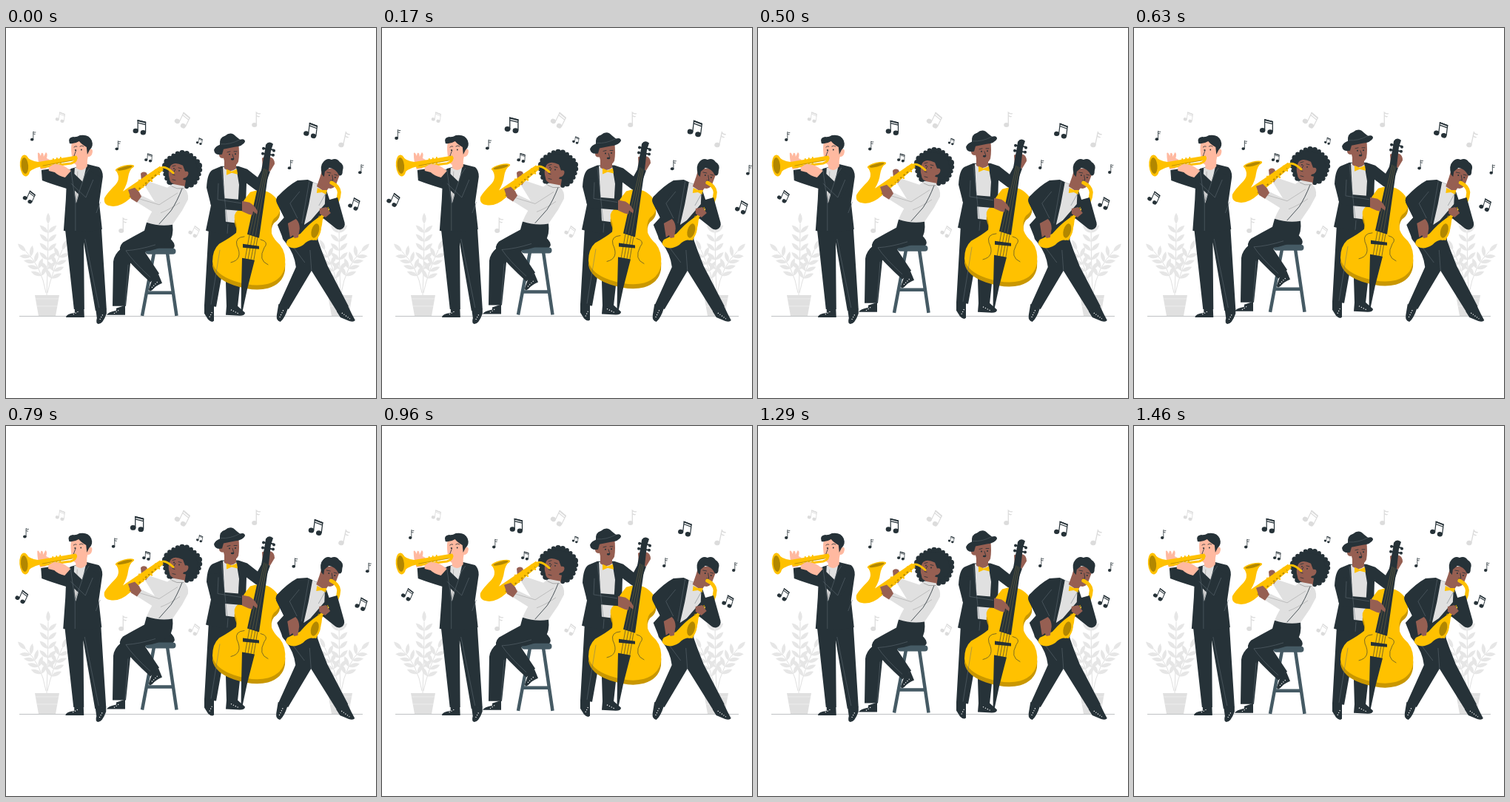
An HTML page for the animation above (1.5 s loop, 500 by 500 pixels).

```html
<!DOCTYPE html>
<html lang="en">
<head>
<meta charset="utf-8">
<title>Jazz band</title>
<style>
html, body { margin: 0; width: 100%; height: 100%; overflow: hidden; background: #fff; }
svg { display: block; width: 100%; height: 100%; }
.dark { fill: #263238; }
.gold { fill: #ffc100; }
.deep { fill: #b28700; }
.pale { fill: #ffb9a0; }
.brown { fill: #965f52; }
.shirt { fill: #e0e0e0; }
.limb { fill: none; stroke: #263238; stroke-linejoin: round; }
.tube { fill: none; stroke: #ffc100; stroke-linecap: round; stroke-linejoin: round; }
.seam { fill: none; stroke: #67737a; stroke-width: .5; }
.ink { fill: none; stroke: #263238; stroke-width: .8; stroke-linecap: round; }
.lace { fill: none; stroke: #fff; stroke-width: 1.2; stroke-dasharray: 1.2 2; }
</style>
</head>
<body>
<svg viewBox="0 0 500 500">
  <defs>
    <g id="pair">
      <ellipse cx="-4.7" cy="5.5" rx="3.6" ry="3.2"/>
      <ellipse cx="5.3" cy="7.7" rx="3.6" ry="3.2"/>
      <path d="M-1.8 5.5V-8.500L8.500 -6V7.500M-1.800 -5.300L8.500 -2.800" fill="none" stroke="currentColor" stroke-width="1.2"/>
      <path d="M-2.4 -9.300L9 -6.500V-4.600L-2.400 -7.400Z"/>
    </g>
    <g id="single">
      <ellipse cx="-.8" cy="5" rx="2.2" ry="1.900"/>
      <path d="M.8 5V-5.500Q2 -4 4.300 -4.600M.8 -3Q2 -1.600 3.600 -2.200" fill="none" stroke="currentColor" stroke-width=".8"/>
    </g>
    <path id="leaf" d="M0 0Q-6 -8 0 -17Q6 -8 0 0Z"/>
    <path id="bassBody" d="M330 222Q346 216 358 224Q372 234 370 247Q369 253 362 258Q357 264 359 278Q362 286 370 293Q379 304 377 322Q374 340 354 346Q335 351 308 342Q282 333 279 316Q279 300 288 292Q304 283 311 277Q313 268 310 262Q306 252 314 246Q320 234 330 222Z"/>
    <g id="plant">
      <g id="leaves" fill="#e6e6e6"></g>
      <path d="M39 361H72L67 389H44Z" fill="#e0e0e0"/>
      <path d="M40 366H71M42 376H69" stroke="#ececec"/>
    </g>
  </defs>

  <use href="#plant"/>
  <use href="#plant" transform="matrix(-1 0 0 1 507 0)"/>
  <g id="paleNotes" fill="#dcdcdc" color="#dcdcdc"></g>
  <path d="M18 389.500H482" stroke="#b8bcbe" stroke-width=".9"/>

  <g class="shake">
    <path class="dark" d="M80 271H105L106 380L92 380ZM102 271L129 269L136 380L121 382Z"/>
    <path class="dark" d="M93 379L105.500 379L106 391H81Q82 386 93 385ZM121.500 381L136 379.500L136 386Q131 400 125 400Q121 399 123 392Z"/>
    <path class="lace" d="M91 387L98 383M127 394L131 387"/>
    <path class="dark" d="M48 192L62 190L86 191L92 214L82 217Q62 211 49 206Z"/>
    <path class="dark" d="M88 190L110 184L126 188Q131 192 131 201L126 236L130 272Q103 278 78 274L81 232L82 208Q82 195 88 190Z"/>
    <path class="shirt" d="M93 189L109 186L106 199L95 237Q91 210 93 189Z"/>
    <path class="ink" d="M97 194L95 234" style="stroke:#aaa"/>
    <path class="pale" d="M95 178H110V187Q102 196 95 189Z"/>
    <path class="pale" d="M89 155Q98 148 110 154L112 164Q118 162 117 168Q116 174 111 174Q110 184 102 185Q92 187 90 178Q87 164 89 155Z"/>
    <path class="dark" d="M86 156Q83 148 91 147Q95 148 100 145Q112 143 116 152Q119 160 113 165L110 171L109 161Q102 157 99 153Q93 157 86 156Z"/>
    <path class="ink" d="M92 161Q94 159 96 160M100 160Q103 158 105 160M95 165L92 173L95 174"/>
    <circle class="dark" cx="94" cy="165" r=".9"/><circle class="dark" cx="102" cy="164.500" r=".9"/>
    <path class="pale" d="M43 169Q45 167 47 173L48 169Q51 168 51 174L54 168Q57 169 55 176L59 178Q57 187 54 190L47 191Q43 182 43 169Z"/>
    <path class="gold" d="M27 172Q32 180 44 181L95 172.500Q98 175 96 178L48 187Q33 190 27 200Z"/>
    <path class="tube" d="M48 188L88 183Q95 181 95 176" stroke-width="3"/>
    <path class="tube" d="M64 177V190M69 176V189M74 175V188" stroke-width="2"/>
    <ellipse class="gold" cx="26" cy="186" rx="7" ry="14.500" transform="rotate(-5 26 186)"/>
    <ellipse class="deep" cx="25.500" cy="186" rx="4.700" ry="11" transform="rotate(-5 25.500 186)"/>
    <path class="ink" d="M50 186L90 179" style="stroke:#b28700"/>
    <path class="limb" d="M122 198L108 223L84 200" stroke-width="16"/>
    <path class="pale" d="M58 188L65 184Q75 184 81 188L88 193L80 202Q71 200 66 195L58 193Z"/>
    <path class="seam" d="M88 192L94 236L107 198L113 189M94 236V274M118 205L108 229L88 210M107 285L126 378M128 235L122 250"/>
  </g>

  <g class="float">
    <path class="dark" d="M149 379L161 375V388H136Q138 384 149 382Z"/>
    <path class="lace" d="M146 386L153 381"/>
    <path class="dark" d="M192 274Q218 276 227 291Q230 298 222 300L186 304L168 318L162 376H144L145 316Q146 306 156 298Z"/>
    <path d="M200 304L184 389M218 304L230.500 389M191 358H224" stroke="#455a64" stroke-width="4.500" fill="none"/>
    <rect x="188.500" y="298" width="41" height="8" rx="4" fill="#455a64"/>
    <path class="dark" d="M190 263L225 265Q227 282 220 290Q205 301 187 302L207 332L195 344Q170 321 156 304Q151 297 158 290Q172 282 187 274Z"/>
    <path class="dark" d="M198 339L206 333L211 345Q203 348 198 354Q193 358 193 353Z"/>
    <path class="lace" d="M197 351L205 343"/>
    <path class="seam" d="M202 293Q180 300 162 301Q171 315 195 337M165 320L161 375"/>
    <ellipse class="dark" cx="238" cy="192" rx="25" ry="23.500"/>
    <g id="curls" class="dark"></g>
    <path class="brown" d="M229 203L243 206L241 218L225 215Z"/>
    <path class="shirt" d="M225 211L241 214L241 217Q247 222 246 232L238 247L225 266Q208 269 190 263Q196 248 204 240L188 214L194 208L218 216Z"/>
    <path class="brown" d="M222 187Q227 180 239 186L242 194Q248 193 246 199Q244 203 240 203Q237 213 229 211Q221 210 221 204Q218 195 222 187Z"/>
    <path class="ink" d="M225 187L229 186M233 189L237 190M229 191L225 198L228 199M225 205L229 206"/>
    <circle class="dark" cx="227" cy="190" r=".9"/><circle class="dark" cx="234" cy="193" r=".9"/>
    <path class="brown" d="M182 197Q185 193 190 196L194 207L189 214L183 207Z"/>
    <path class="gold" d="M208 187L213 192L167 231Q155 242 143 241Q131 240 133 230Q136 224 148 212Q156 203 148 192L173 186Q166 193 165 202Q164 211 158 221Z"/>
    <ellipse class="gold" cx="160.500" cy="189.500" rx="13" ry="3.600" transform="rotate(-14 160.500 189.500)"/>
    <ellipse class="deep" cx="160.500" cy="189.500" rx="10.500" ry="2.200" transform="rotate(-14 160.500 189.500)"/>
    <path class="tube" d="M209 190Q214 185 226 196" stroke-width="3"/>
    <path d="M207 195L166 229" fill="none" stroke="#b28700" stroke-width="2" stroke-dasharray="2.500 3"/>
    <path class="tube" d="M180 206L185 215M190 200L197 207M202 192L207 198" stroke-width="2.400"/>
    <path class="shirt" d="M241 219Q248 225 243 235L215 253Q209 256 203 252L176 235L182 226L207 238L228 222Z"/>
    <path class="seam" style="stroke:#999" d="M180 231L207 239L232 223M209 250Q220 246 235 236"/>
    <path class="brown" d="M165 219L174 216L180 222L183 228L177 236L169 231Z"/>
    <path class="ink" d="M238 217Q231 235 223 247L207 265" stroke-width="2"/>
    <path class="ink" d="M224 214L231 217L240 217" style="stroke:#999"/>
  </g>

  <g class="float">
    <path class="dark" d="M274 270L312 274L317 340L313 377H298L296 310L284 377L268 375Z"/>
    <path class="dark" d="M268 374L281 376V396Q278 399 273 394L268 386ZM298 376L313 376L323 385Q323 389 316 389L297 388Z"/>
    <path class="lace" d="M275 391L279 383M304 381L314 386"/>
    <path class="dark" d="M291 187L314 187L326 191L340 202L346 191L357 194L348 219Q344 224 337 219L325 210L323 270L309 279Q289 280 270 274L277 240L271 216Q272 196 279 192Z"/>
    <path class="shirt" d="M293 188L311 188L315 212L312 264L297 262Z"/>
    <path class="brown" d="M295 177H311V190Q303 197 295 190Z"/>
    <path class="brown" d="M292 160L314 155Q316 170 314 181Q310 189 302 187Q295 184 294 176Q288 177 288 171Q289 166 292 169Z"/>
    <path class="dark" d="M289 158Q288 148 296 146Q304 139 311 147L316 151Q323 149 323 154Q320 160 309 161L294 164L292 171Q282 173 281 165Q283 160 289 158Z"/>
    <path d="M290 157Q303 158 316 151" fill="none" stroke="#4a555b" stroke-width=".8"/>
    <path class="ink" d="M299 168L303 167M308 167L312 167M306 171L308 177L305 177"/>
    <circle class="dark" cx="302" cy="171" r="1"/><circle class="dark" cx="310" cy="170.500" r="1"/>
    <ellipse class="dark" cx="306" cy="177.500" rx="2.200" ry="1.300"/>
    <path class="gold" d="M298 191L305 194L312 191L313 198L305 196L298 199Z"/>
    <use href="#bassBody" y="6" fill="#c99700"/>
    <use href="#bassBody" class="gold"/>
    <path class="brown" d="M346 176L351 174L358 175Q363 177 363 184L357 194L347 191Z"/>
    <path class="dark" d="M350 165L351 158Q355 152 361 157L358 166L355 193L342 284L326 279L345 193Z"/>
    <path class="limb" d="M348 163L362 165M347 170L361 172" stroke-width="2"/>
    <circle class="dark" cx="348" cy="163" r="2"/><circle class="dark" cx="362" cy="166" r="2"/>
    <circle class="dark" cx="347" cy="170" r="2"/><circle class="dark" cx="361" cy="172" r="2"/>
    <path class="dark" d="M320 292L342 295V299L320 297Z"/>
    <path class="ink" d="M329 280L323 313M333 281L327 313M337 282L331 313M340 283L335 313" style="stroke-width:.6"/>
    <path class="seam" d="M349 190L329 279M351 191L333 280M353 192L337 281" style="stroke:#7d7040"/>
    <path class="dark" d="M319 311L336 314L326 353L319 386H317.500L318 352Z"/>
    <path class="ink" d="M322 282Q309 283 312 294Q321 313 304 317M344 286Q356 289 349 297Q340 314 354 320" style="stroke-width:.6"/>
    <path class="limb" d="M281 205L284 237L320 240" stroke-width="15"/>
    <path class="brown" d="M319 234L329 236Q336 240 340 248L339 252L334 248L333 253L328 252L319 248Z"/>
    <path class="seam" d="M291 190Q295 225 299 263M287 210L286 232L318 237M300 265L299 278M289 300L277 374"/>
  </g>

  <g class="shake">
    <path class="dark" d="M374 276L419 279Q426 300 435 322L463 376L448 384L413 328L382 380L369 374L392 323Q390 305 378 290Z"/>
    <path class="dark" d="M368.500 373L381 379Q377 392 371 397Q365 396 366 388ZM447 383L462 375Q467 386 472 395Q470 398 464 396L452 391Z"/>
    <path class="lace" d="M370 391L375 381M454 385L465 393"/>
    <path class="dark" d="M394 206L408 205L432 216L440 240L424 258L421 290L384 293Q374 289 373 281L367 266L376 256L367 238Q364 232 367 228Q381 213 394 206Z"/>
    <path class="shirt" d="M415 208L432 217L431 238L412 260L403 266Q410 238 415 208Z"/>
    <path class="brown" d="M424 203L439 212L432 222L420 214Z"/>
    <path class="brown" d="M428 190L449 190L452 196L446 212Q441 220 433 215Q423 212 424 203Z"/>
    <path class="dark" d="M427 198Q424 186 429 181Q434 175 440 178Q447 175 451 181Q458 185 455 193Q455 201 450 199Q446 190 437 189L431 194L430 201Z"/>
    <path class="ink" d="M434 195L439 196M444 198L448 199M441 199L442 206L439 206"/>
    <circle class="dark" cx="437" cy="199" r="1"/><circle class="dark" cx="445" cy="202" r="1"/>
    <path class="gold" d="M421 216L427 219L434 219L433 225L427 222L420 223Z"/>
    <path class="tube" d="M440 209Q450 214 450.500 222Q450 235 440 245L419 262" stroke-width="5"/>
    <path class="gold" d="M444 240L428 259Q427 273 420 287Q410 284 402 293Q391 300 383 296Q376 292 381 286L398 278Q410 264 421 257Z"/>
    <ellipse class="gold" cx="418" cy="274" rx="7.500" ry="13" transform="rotate(16 418 274)"/>
    <ellipse class="deep" cx="418" cy="274" rx="5" ry="10" transform="rotate(16 418 274)"/>
    <path d="M448 231L421 257" stroke="#b28700" stroke-width="1.600" stroke-dasharray="2.500 3"/>
    <path class="limb" d="M441 231L450.500 265L433 251" stroke-width="15"/>
    <path class="dark" d="M394 208L367 228Q364 233 367 238L381 266L394 257L384 237Z"/>
    <path class="brown" d="M381 264L392 258Q397 263 397 271L395 283L390 284L388 280L384 283Z"/>
    <path class="brown" d="M424 244L433 242L439 250L432 256L424 251Z"/>
    <path class="seam" d="M410 207L400 264M397 221L384 237L394 257M433 222L423 240M411 300L413 328M389 297L404 317"/>
  </g>

  <g id="darkNotes" class="dark" color="#263238"></g>
</svg>
<script>
const $ = id => document.getElementById(id);
const LOOP = 1500, LEAD = 20, TAU = Math.PI * 2;

function add(parent, tag, attributes) {
  const node = document.createElementNS('http://www.w3.org/2000/svg', tag);
  for (const name in attributes) node.setAttribute(name, attributes[name]);
  parent.append(node);
}

function stamp(parent, shape, x, y, turn, size) {
  add(parent, 'use', { href: '#' + shape, transform: `translate(${x} ${y}) rotate(${turn}) scale(${size})` });
}

// Each branch is a quadratic curve carrying pairs of leaves.
function branch(x0, y0, x1, y1, x2, y2, pairs) {
  add($('leaves'), 'path', { d: `M${x0} ${y0}Q${x1} ${y1} ${x2} ${y2}`, fill: 'none', stroke: '#e0e0e0' });
  for (let i = 0; i <= pairs; i++) {
    const u = .35 + .65 * i / pairs, v = 1 - u;
    const x = v * v * x0 + 2 * u * v * x1 + u * u * x2;
    const y = v * v * y0 + 2 * u * v * y1 + u * u * y2;
    const dx = v * (x1 - x0) + u * (x2 - x1), dy = v * (y1 - y0) + u * (y2 - y1);
    const turn = Math.atan2(dx, -dy) * 360 / TAU;
    for (const side of i < pairs ? [-48, 48] : [0]) stamp($('leaves'), 'leaf', x, y, turn + side, .9);
  }
}
branch(55, 361, 57, 310, 57, 265, 5);
branch(54, 358, 48, 322, 27, 302, 4);
branch(56, 358, 62, 330, 76, 300, 4);

for (let i = 0; i < 24; i++) {
  const a = i * TAU / 24;
  add($('curls'), 'circle', { cx: 238 + 24 * Math.cos(a), cy: 192 + 23 * Math.sin(a), r: 3.2 + Math.sin(i * 5) * .7 });
}

const darkNotes = [
  ['pair', 181, 134, 0, 1], ['pair', 409, 138, 7, 1], ['pair', 34, 226.5, 24, .8],
  ['pair', 467, 236, 16, .8], ['pair', 193, 175, 3, .58], ['pair', 261, 153, 10, .45],
  ['single', 39, 146, 0, 1], ['single', 152, 158.5, 0, 1],
  ['single', 382, 184, 0, 1], ['single', 476, 190, 0, 1]
];
const paleNotes = [
  ['pair', 73, 120, 8, .7], ['pair', 238, 123, 26, 1], ['pair', 254, 274, 24, .75],
  ['single', 337, 123, 0, 1.6], ['single', 456, 150, 12, 1.7], ['single', 157, 266, 0, 1.6]
];
darkNotes.forEach(n => stamp($('darkNotes'), ...n));
paleNotes.forEach(n => stamp($('paleNotes'), ...n));

// Evenly spaced keyframes over one loop, joined by straight lines.
const FLOAT = [0, -6, 0];
const SHAKE = [0, -1, 2, -4, 4, -4, 4, -4, 2, -1, 0];
const HEARTBEAT = [1, 1.1, 1.05, 1, 1, 1.1, 1, 1, 1, 1, 1];

function at(keys, u) {
  const place = u * (keys.length - 1), i = Math.floor(place);
  return keys[i] + (keys[i + 1] - keys[i]) * (place - i);
}

function move(selector, transform) {
  document.querySelectorAll(selector).forEach(g => g.setAttribute('transform', transform));
}

function draw() {
  const u = (performance.now() + LEAD) % LOOP / LOOP;
  move('.float', `translate(0 ${at(FLOAT, u)})`);
  move('.shake', `translate(${at(SHAKE, u)} 0)`);
  move('#darkNotes', `translate(254 175) scale(${at(HEARTBEAT, u)}) translate(-254 -175)`);
  requestAnimationFrame(draw);
}
draw();
</script>
</body>
</html>
```
